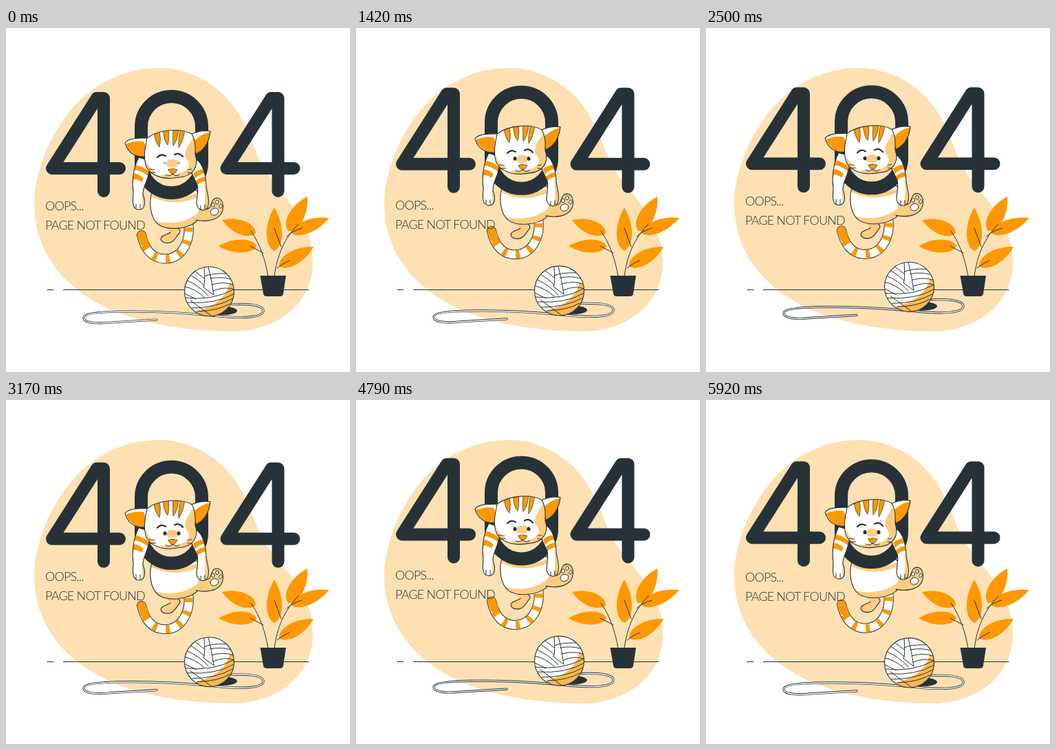
An HTML page with a canvas that plays this animation: 500 by 500 pixels, repeating every 5960 ms.

```html
<!DOCTYPE html>
<html lang="en">
<head>
<meta charset="utf-8">
<title>Page not found</title>
<style>
html, body { margin: 0; width: 100%; height: 100%; overflow: hidden; background: #fff; }
canvas { position: absolute; left: 0; top: 0; width: 500px; height: 500px; }
#note {
  position: absolute; left: 57px; top: 244px; color: #263238; white-space: pre;
  font: 300 18px/28px Lato, "Open Sans", sans-serif; letter-spacing: -0.8px;
}
</style>
</head>
<body>
<canvas id="stage"></canvas>
<div id="note">OOPS...
PAGE NOT FOUND</div>
<script>
const LOOP = 5960;
const DARK = '#263238', ORANGE = '#ff9800', PEACH = '#ffe0b2', SHADE = '#ffcc80', WHITE = '#fff';
const canvas = document.getElementById('stage');
const note = document.getElementById('note');
const ctx = canvas.getContext('2d');
const ratio = window.devicePixelRatio || 1;
canvas.width = canvas.height = 500 * ratio;
ctx.lineCap = ctx.lineJoin = 'round';

function shape(d, fill, stroke, width = 1) {
  const p = new Path2D(d);
  if (fill) { ctx.fillStyle = fill; ctx.fill(p); }
  if (stroke) { ctx.strokeStyle = stroke; ctx.lineWidth = width; ctx.stroke(p); }
}
const line = (d, width = 1, color = DARK) => shape(d, null, color, width);

function oval(x, y, rx, ry, fill, stroke, turn = 0) {
  ctx.beginPath();
  ctx.ellipse(x, y, rx, ry, turn, 0, 7);
  if (fill) { ctx.fillStyle = fill; ctx.fill(); }
  if (stroke) { ctx.strokeStyle = stroke; ctx.lineWidth = 1; ctx.stroke(); }
}

// Fill an outline, paint details clipped to it, then ink the edge.
function inked(d, fill, details) {
  shape(d, fill);
  if (details) {
    ctx.save();
    ctx.clip(new Path2D(d));
    details();
    ctx.restore();
  }
  line(d, 1.1);
}

function shifted(x, y, draw) {
  ctx.save();
  ctx.translate(x, y);
  draw();
  ctx.restore();
}

function leaf(x, y, tx, ty, w) {
  const dx = tx - x, dy = ty - y, len = Math.hypot(dx, dy);
  const nx = -dy / len * w, ny = dx / len * w;
  const at = (k, s) => `${x + dx * k + nx * s} ${y + dy * k + ny * s} `;
  shape(`M${x} ${y}C${at(.1, 1)}${at(.6, 1.1)}${tx} ${ty}C${at(.6, -1.1)}${at(.1, -1)}${x} ${y}Z`, ORANGE);
}

function backdrop() {
  shape('M220 58C263 57 308 80 333 117C357 153 358 175 375 204C397 243 446 275 446 340C446 402 392 441 330 441C265 441 190 430 137 402C75 369 41 318 41 255C41 212 62 159 92 122C126 80 172 59 220 58Z', PEACH);
  line('M60 380.5H69M83.500 380.500H440');
}

function plant() {
  leaf(363, 298, 314, 279, 13);
  leaf(364, 317, 309, 317, 12);
  leaf(390, 324, 390, 261, 14);
  leaf(410, 295, 438, 245, 14);
  leaf(415, 298, 470, 276, 12);
  leaf(397, 346, 447, 318, 13);
  line('M381 361C377 338 370 315 356 295M374 327L355 317M390 361C394 330 405 305 425 285M400 318L390 291M408 303Q414 296 430 291M394 349Q402 342 412 338');
  shape('M369.500 360H407L403 386Q402.500 390 398 390H379Q374.500 390 374 386Z', DARK);
}

const four = () => line('M142 237V102H132L67 204H165', 18);

function yarn() {
  const thread = 'M328 401.500C345 401 374 401 374 411C374 421 345 422 310 419C270 415 235 412 185 412C145 412 113 414 113 421C113 429 132 430 152 428L219 424';
  line(thread, 3.2);
  line(thread, 1.4, WHITE);
  oval(313, 411, 23, 6.5, DARK);
  inked('M259.500 383A36 36 0 1 1 331.500 383A36 36 0 1 1 259.500 383Z', WHITE, () => {
    shape('M272 413C299 407 320 394 325 371L340 375L325 425H270Z', '#ffb74d');
    line('M260 376Q275 379 288 391M263 367Q279 373 294 389M268 359Q280 366 288 374M274 353L288 364M260 386L276 394');
    line('M288 349Q290 371 287 377L302 388M294 347Q299 366 302 388M288 361Q299 356 320 357M297 364Q313 361 326 365M299 373Q316 368 330 373M301 382Q319 375 331 380');
    line('M260 392Q300 397 331 380M264 399Q305 402 332 386M270 407Q305 407 330 393M278 412Q308 411 325 401M268 396L298 418');
  });
}

function tail() {
  const d = 'M265 283C269 311 255 336 230 335.500C211 335 201 319 197 301';
  line(d, 14);
  line(d, 12, WHITE);
  ctx.save();
  ctx.lineCap = 'butt';
  ctx.setLineDash([6, 13]);
  ctx.lineDashOffset = -7;
  line(d, 12, ORANGE);
  ctx.restore();
  line('M201 312L197 301', 12, ORANGE);
}

function body() {
  tail();
  inked('M232 290C240 285 257 291 252 298C247 303 246 310 238 312C229 314 223 309 226 304C230 300 236 300 239 297', SHADE);
  inked('M213 236C207 252 209 276 222 286C236 295 263 292 276 282C289 271 284 248 277 236Z', WHITE, () => {
    shape('M216 280C240 288 270 281 286 262L282 300L215 300Z', SHADE);
    shape('M213 238Q246 254 282 238V244Q246 262 211 245Z', SHADE);
  });
  inked('M276 279C290 282 305 280 312 271C318 262 316 248 307 247C299 247 299 256 296 261C291 266 285 263 281 259', SHADE);
  oval(303, 267, 6, 5, WHITE, DARK, -.4);
  oval(301, 257, 2.2, 3, WHITE, DARK);
  oval(307, 253, 2.2, 3, WHITE, DARK);
  oval(312, 259, 2, 3, WHITE, DARK, .4);
}

function arms() {
  inked('M193 188C184 205 183 226 185 240C184 251 183 264 193 264C203 264 203 252 199 242C199 231 204 226 207 213L212 194Z', WHITE, () => {
    shape('M187 199Q196 199 210 210L208 216Q195 206 184 206Z', ORANGE);
    shape('M182 211Q193 211 200 219L197 224Q190 219 182 220Z', ORANGE);
    shape('M200 232Q195 252 201 267L208 240Z', SHADE);
  });
  inked('M272 190C283 191 290 207 291 229C292 240 297 251 293 261C288 268 277 265 277 253C278 242 280 237 278 228L270 211Z', WHITE, () => {
    shape('M272 211Q281 204 291 205L290 211Q280 212 275 219Z', ORANGE);
    shape('M276 222Q284 215 293 216V222Q284 223 278 228Z', ORANGE);
    shape('M288 228Q292 246 286 268H299V235Z', SHADE);
  });
  line('M189 256V262M195 256V262M283 258V264M289 257V263');
}

function face(blink) {
  line('M220 188Q225 182 232 186M245 184Q251 180 257 187', 2.2);
  const open = 2.9 * (1 - blink) + .5 * blink;
  oval(231, 196, 2.5, open, DARK);
  oval(251, 196, 2.5, open, DARK);
  shape('M236 206Q242 203 249 206Q246 212 242 213Q238 211 236 206Z', ORANGE, DARK, .7);
  line('M242 212Q237 217 232 213M242 212Q247 217 252 213');
  line('M216 206L208 205M217 210L209 211M264 206L270 205M264 210L271 211', .9);
}

function head(blink) {
  inked('M207 160C195 160 179 159 173 167C177 180 185 188 202 187C207 180 209 169 207 160Z', WHITE, () => {
    shape('M174 169Q186 163 200 165Q206 176 202 188Q184 188 174 169Z', ORANGE);
  });
  inked('M268 155Q283 148 297 150Q294 175 276 183Z', WHITE, () => {
    shape('M270 168Q281 154 298 151Q295 178 275 183Q268 174 270 168Z', ORANGE);
  });
  inked('M205 160C222 147 255 145 270 154C276 164 275 174 275 184C281 201 272 216 251 217C228 222 207 213 203 199C199 184 203 173 205 160Z', WHITE, () => {
    shape('M271 160C265 172 258 177 261 189C271 200 265 210 246 213L222 214L245 224L286 213V165Z', SHADE);
    shape('M202 185Q205 203 220 211L206 211Z', SHADE);
    shape('M236 191Q230 201 237 202L248 202Q253 191 243 191Z', SHADE);
    shape('M215 149Q216 166 223 173Q226 160 222 146ZM228 145Q229 164 235 170Q238 159 236 145ZM243 145Q242 163 243 171Q250 163 251 146ZM254 145Q250 163 251 174Q258 164 260 147Z', ORANGE, DARK, .7);
  });
  face(blink);
}

function hanging(blink) {
  four();
  shifted(253.500, 0, four);
  body();
  line('M196.500 143.500A44 44 0 0 1 284.500 143.500V195.500A44 44 0 0 1 196.500 195.500Z', 19);
  arms();
  head(blink);
}

// Linear rise and fall of ten pixels.
function float(t, period) {
  const p = Math.max(t, 0) % period / period;
  return -10 * (1 - Math.abs(1 - 2 * p));
}

function blinkAt(t) {
  const gap = Math.min(t, Math.abs(t - 3830), LOOP + 200 - t);
  return Math.max(0, Math.min(1, 1.6 - gap / 80));
}

function draw(now) {
  const t = now % LOOP;
  const bob = float(t, 1500);
  ctx.setTransform(ratio, 0, 0, ratio, 0, 0);
  ctx.fillStyle = WHITE;
  ctx.fillRect(0, 0, 500, 500);
  backdrop();
  plant();
  shifted(0, bob, yarn);
  shifted(0, float(t - 500, 3000), () => hanging(blinkAt(t)));
  note.style.transform = `translateY(${bob}px)`;
}

const start = performance.now();
function tick() {
  draw(performance.now() - start);
  requestAnimationFrame(tick);
}
tick();
</script>
</body>
</html>
```
